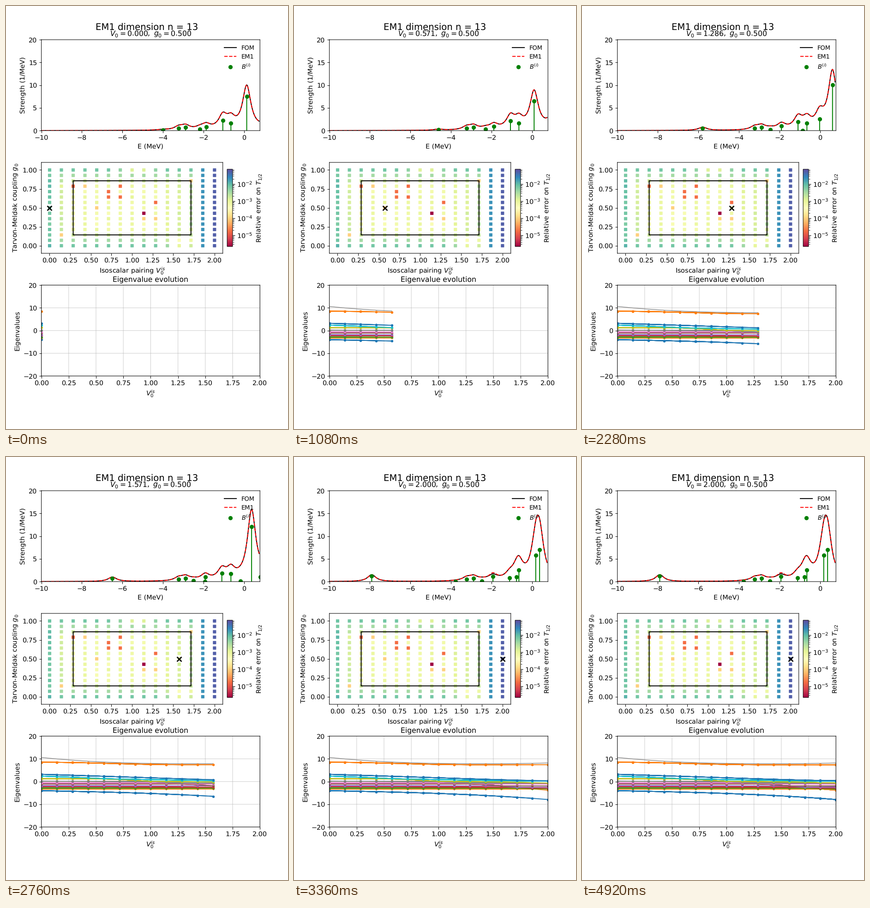
Animation of 611x917 px, one loop 5.04 s. Source, as a matplotlib script:

```python
import numpy as np
import matplotlib.pyplot as plt
from matplotlib.animation import FuncAnimation
from matplotlib.colors import LogNorm
from matplotlib.patches import Rectangle

FRAMES, STEP_MS = 42, 120
N = 15                      # grid points per parameter
LAYERS = 10                 # overlaid redraws of the eigenvalue lines
WIDTH = 0.25                # Lorentzian half width in MeV

plt.rcParams.update({
    "font.family": "DejaVu Sans",
    "font.size": 11,
    "axes.titlesize": 12,
    "legend.fontsize": 10,
    "text.hinting": "none",
    "path.snap": False,
})

v = np.linspace(0, 2, N)            # isoscalar pairing
late = (v / 2) ** 8                 # mixing that sets in at strong pairing
energy = np.linspace(-10, 0.74, 800)


def level_model():
    """Energies and strengths of all levels along the pairing axis."""
    bound = 7.5 * np.clip(1 - (v / 1.57) ** 2, 0, None) + late
    upper = 7 * late
    total = 10.2 + 2.4 * v - 0.3 * v ** 2
    pairs = [
        (-4.01 - 0.99 * v - 0.24 * v ** 3, 0.1 + 0.27 * v ** 2),
        (-3.23, 0.55),
        (-2.89, 0.73),
        (-2.18 - 0.22 * v + 0.15 * late, 0.35 - 0.1 * v),
        (-1.87 - 0.03 * v, 0.82 + 0.13 * v),
        (-1.05 - 0.03 * v, 2.27 - 0.2 * v - late),
        (-0.65, 1.65 + 0.9 * late),
        (0.13 - 0.05 * v - 0.8 * (v / 2) ** 5, bound),
        (0.18 + 1.12 * (1 - (v / 2) ** 2.2) ** 2, total - bound - upper),
        (2.4 - 1.55 * v - 0.77 * v ** 2, 0.04),
        (3.2 - 1.55 * v + 0.27 * late, upper),
        (7.4 + 0.55 * (1 + np.cos(np.pi * np.minimum(v / 1.3, 1))), 0),
    ]
    return np.array([[part + 0 * v for part in pair] for pair in pairs]).swapaxes(0, 1)


levels, weights = level_model()
sorted_levels = np.sort(levels, axis=0)
full_top = 7.85 + 1.186 * np.abs(v - 1.4) ** 2.5


def spectrum(k):
    gap = energy[:, None] - levels[:, k]
    return (weights[:, k] * WIDTH / np.pi / (gap ** 2 + WIDTH ** 2)).sum(axis=1)


def full_spectrum(k):
    """The reduced model overshoots slightly at strong pairing."""
    return spectrum(k) - 0.25 * late[k] * np.exp(-((energy + 1.92) / 0.2) ** 2)


def error_map():
    """Colour level 0..1 of the error, indexed [row, column]."""
    rng = np.random.default_rng(3)
    row, col = np.mgrid[:N, :N]
    level = 0.56 + 0.23 * np.exp(-1.1 * col) + 0.035 * np.clip(col - 9, 0, 3)
    level += rng.normal(0, 0.015, level.shape)

    # The error grows towards the upper and lower border, with one dip on each.
    depth = np.minimum(row, N - 1 - row)
    level = np.where(depth < 3, np.maximum(level, 0.78 - 0.07 * depth), level)
    for rows, centre in ((row == N - 1, 7.5), (row < 2, 11.3)):
        level -= 0.2 * rows * np.exp(-((col - centre) / 1.2) ** 2)
    level = np.where(col > 12, 0.88 + 0.09 * (col - 13), level)

    spots = {
        0.20: [(2, 11), (6, 11), (5, 10), (5, 9), (6, 9), (9, 8)],
        0.37: [(3, 11), (4, 7), (8, 5), (9, 5), (1, 2), (12, 12)],
        0.00: [(8, 6)],
    }
    for value, cells in spots.items():
        for c, r in cells:
            level[r, c] = value
    return level


fig, (ax_s, ax_e, ax_l) = plt.subplots(3, 1, figsize=(6.5, 9.7554), dpi=94)
fig.subplots_adjust(left=0.1254, right=0.9005, top=0.9203, bottom=0.1253, hspace=0.35)
fig.suptitle("EM1 dimension n = 13", fontsize=15, x=0.5, y=0.96)

# Strength function
ax_s.set(xlim=(-10, 0.782), ylim=(0, 20), xlabel="E (MeV)",
         ylabel="Strength (1/MeV)", xticks=range(-10, 1, 2), yticks=range(0, 21, 5))
fom, = ax_s.plot([], [], "k-", label="FOM")
em1, = ax_s.plot([], [], "r--", label="EM1")
stems, = ax_s.plot([], [], "g-")
heads, = ax_s.plot([], [], "go", label="$B^{(i)}$")
ax_s.legend(loc="upper right", frameon=False)
title = ax_s.set_title("")

# Error map with its colour bar
box = ax_e.get_position()
ax_e.set_position([box.x0, box.y0, 0.83 * box.width, box.height])
ax_e.set(xlim=(-0.1, 2.1), ylim=(-0.1, 1.1),
         xticks=np.arange(0, 2.1, 0.25), yticks=np.arange(0, 1.1, 0.25),
         xlabel="Isoscalar pairing $V_0^{is}$", ylabel="Tarvon-Meldak coupling $g_0$")
low, high = np.log10(2.2e-6), np.log10(0.073)
pairing, coupling = np.meshgrid(v, np.linspace(0, 1, N))
points = ax_e.scatter(pairing, coupling, c=10 ** (low + error_map() * (high - low)),
                      s=20, marker="s", cmap="Spectral",
                      norm=LogNorm(10 ** low, 10 ** high))
ax_e.add_patch(Rectangle((2 / 7, 1 / 7), 10 / 7, 5 / 7, fill=False, lw=1.5, zorder=2))
cross, = ax_e.plot([], [], "kx", ms=7, mew=2, zorder=3)
cax = fig.add_axes([box.x0 + 0.85 * box.width, box.y0 + 0.075 * box.height,
                    0.0192, 0.85 * box.height])
fig.colorbar(points, cax=cax, label="Relative error on $T_{1/2}$")

# Eigenvalues
ax_l.set(xlim=(0, 2), ylim=(-20, 20), title="Eigenvalue evolution",
         xticks=np.arange(0, 2.1, 0.25), yticks=range(-20, 21, 10),
         xlabel="$V_0^{is}$", ylabel="Eigenvalues")
ax_l.grid(alpha=0.6)
top_line, = ax_l.plot([], [], color="gray", lw=1)
layers = [[ax_l.plot([], [], "o-", color=f"C{i % 10}", ms=3)[0]
           for i in range(len(levels))] for _ in range(LAYERS)]


def grid_index(frame):
    return min(frame // 2, N - 1)


def update(frame):
    k = grid_index(frame)
    title.set_text(rf"$V_0={v[k]:.3f},\ g_0=0.500$")
    fom.set_data(energy, full_spectrum(k))
    em1.set_data(energy, spectrum(k))

    seen = levels[:, k] < 0.83
    e, b = levels[seen, k], weights[seen, k]
    heads.set_data(e, b)
    stems.set_data(np.repeat(e, 3), np.column_stack([0 * b, b, b * np.nan]).ravel())

    cross.set_data([v[k]], [0.5])
    top_line.set_data(v[:k + 1], full_top[:k + 1])

    # Every step draws over the earlier ones, which hardens the line edges.
    for age, layer in zip(range(LAYERS - 1, -1, -1), layers):
        n = grid_index(frame - age) + 1 if frame >= age else 0
        for line, values in zip(layer, sorted_levels):
            line.set_data(v[:n], values[:n])
            line.set_visible(n > 0)
    return []


anim = FuncAnimation(fig, update, frames=FRAMES, interval=STEP_MS,
                     repeat=True, repeat_delay=0, blit=False)
plt.show()
```
